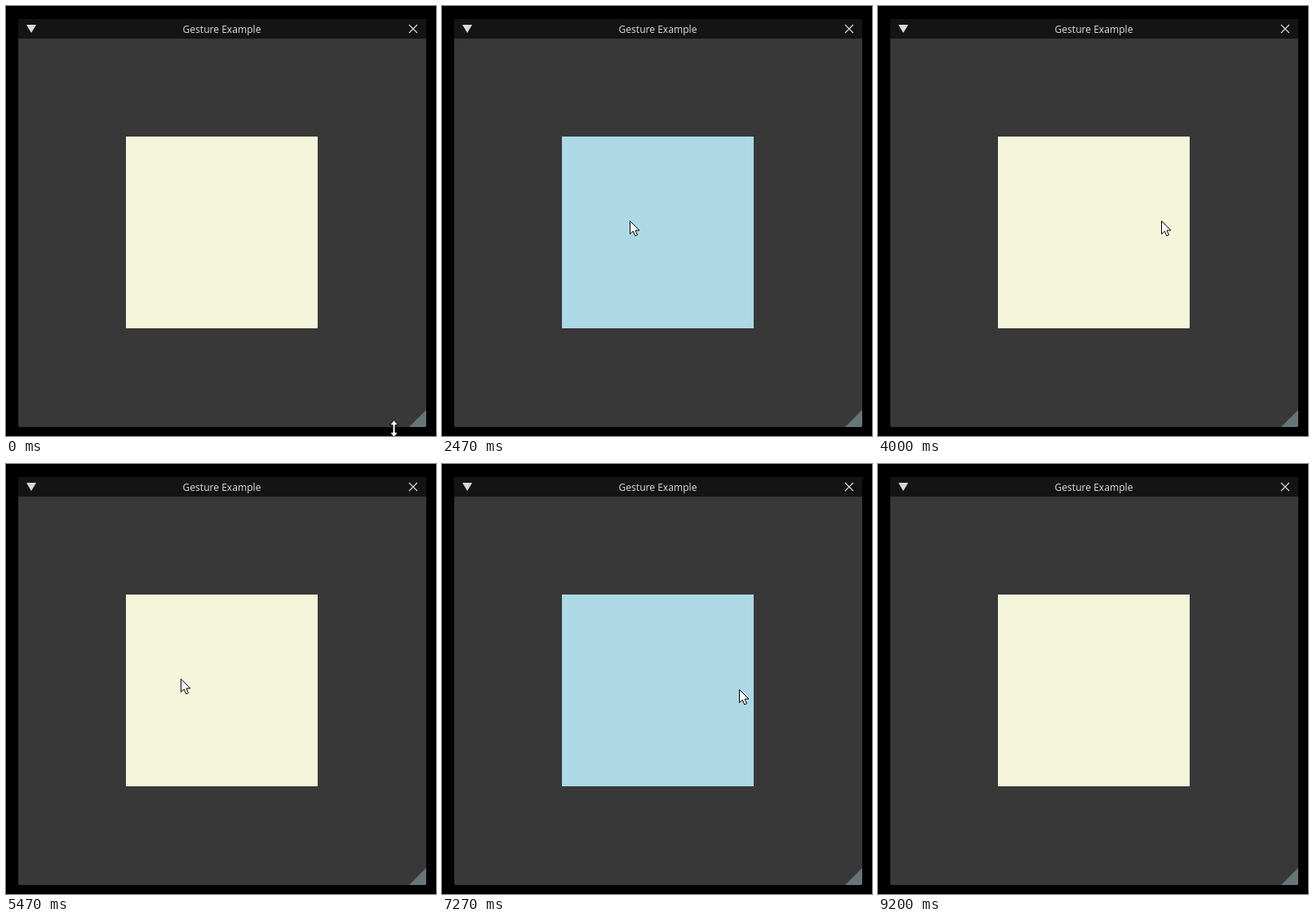
Recreate the animation shown at these times as an HTML page. Size 527 px wide and 527 px high, loop 9.39 s.

```html
<!DOCTYPE html>
<html lang="en">
<head>
<meta charset="utf-8">
<title>Gesture Example</title>
<style>
  html, body { margin: 0; width: 100%; height: 100%; overflow: hidden; background: #000; }
  svg { display: block; width: 100%; height: 100%; }
  text { font: 500 12px "Noto Sans", sans-serif; }
</style>
</head>
<body>
<svg viewBox="0 0 527 527">
  <rect width="527" height="527" fill="#000"/>
  <rect x="15" y="16" width="500" height="500" rx="2" fill="#383838"/>
  <path d="M15 40V18a2 2 0 0 1 2-2H513a2 2 0 0 1 2 2V40Z" fill="#141414"/>
  <path d="M25 23H37L31 33Z" fill="#d8d8d8"/>
  <path d="M494 23L504 33M504 23L494 33" stroke="#d8d8d8" stroke-width="1.2"/>
  <text x="264.5" y="33" text-anchor="middle" fill="#d2d2d2">Gesture Example</text>
  <path d="M515 495V514a2 2 0 0 1-2 2H494Z" fill="#687578"/>
  <rect id="box" x="147" y="160" width="235" height="235"/>
  <path id="resize" d="M475.5 507.5L480.5 513.5H477V522.5H480.5L475.5 528.5L470.5 522.5H474V513.5H470.5Z"
    fill="#fff" stroke="#000"/>
  <path id="arrow" d="M.5 .5V16.5L4.3 13L6.7 18.8L9.5 17.6L7 12H11.9Z" fill="#fff" stroke="#000"/>
</svg>
<script>
const LOOP = 9390;
const BEIGE = '#f5f5dc', INDIGO = '#4b0082', BLUE = '#add8e6';
const [box, resize, arrow] = ['box', 'resize', 'arrow'].map(id => document.getElementById(id));

const colors = [
  [0, BEIGE], [1470, INDIGO], [2400, BLUE], [4000, BEIGE],
  [6200, INDIGO], [6800, BLUE], [8330, BEIGE]
];

// The pointer is sampled in discrete steps between start and end.
const moves = [
  { start: 70, end: 670, steps: 10, from: [475, 517], to: [214, 263], bow: 0 },
  { start: 2400, end: 3130, steps: 12, from: [214, 263], to: [347, 263], bow: 0 },
  { start: 5130, end: 5600, steps: 8, from: [347, 263], to: [180, 266], bow: -4.5 },
  { start: 6800, end: 7270, steps: 8, from: [180, 266], to: [364, 276], bow: 0 },
  { start: 8870, end: 9200, steps: 6, from: [364, 276], to: [100, 530], bow: 0 }
];

const ease = p => (p + p * p * (3 - 2 * p)) / 2;

function pointer(t) {
  const m = moves.filter(m => t >= m.start).pop();
  const dt = (m.end - m.start) / (m.steps - 1);
  const step = Math.min(m.steps, Math.floor((t - m.start + 5) / dt) + 1);
  const p = ease(step / m.steps);
  const at = i => m.from[i] + (m.to[i] - m.from[i]) * p;
  return [Math.round(at(0)), Math.round(at(1) + m.bow * Math.sin(Math.PI * p))];
}

function draw(t) {
  box.setAttribute('fill', colors.filter(c => t >= c[0]).pop()[1]);
  const resizing = t < moves[0].start;
  const visible = !resizing && t < moves[moves.length - 1].end;
  resize.style.display = resizing ? '' : 'none';
  arrow.style.display = visible ? '' : 'none';
  if (visible) arrow.setAttribute('transform', `translate(${pointer(t)})`);
}

const begin = performance.now();
function tick() {
  draw((performance.now() - begin) % LOOP);
  requestAnimationFrame(tick);
}
tick();
</script>
</body>
</html>
```
